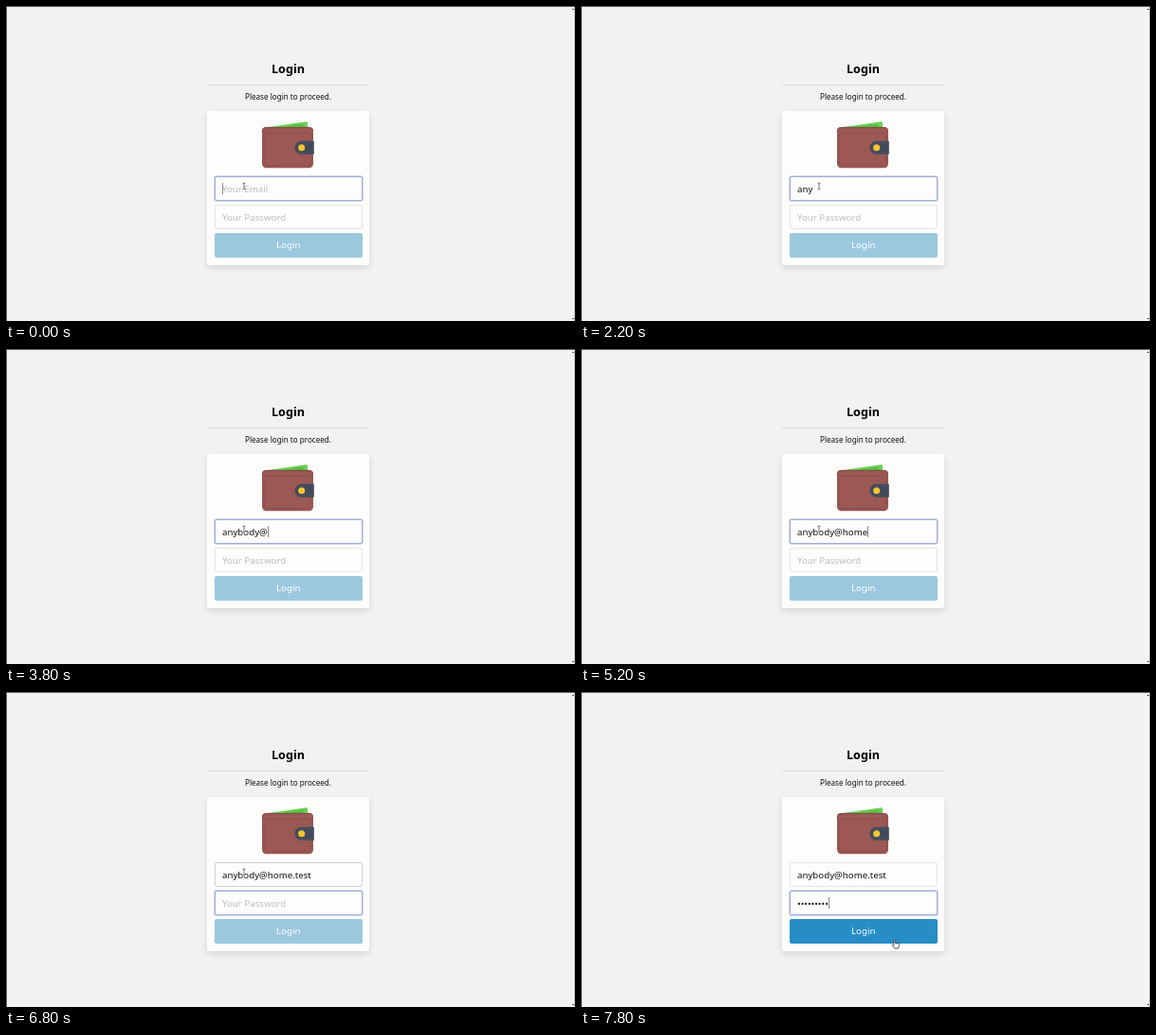
Recreate the animation shown at these times as an HTML page. Size 600 by 333 pixels, loop 8000 ms.

```html
<!DOCTYPE html>
<html lang="en">
<head>
<meta charset="utf-8">
<title>Login</title>
<style>
  html, body { margin: 0; width: 100%; height: 100%; overflow: hidden; }
  body {
    position: relative;
    background: #f3f2f0;
    color: #111;
    font: 9.7px "Noto Sans", "Open Sans", sans-serif;
  }
  body > *, .card > * { position: absolute; box-sizing: border-box; }
  .edge { inset: 0; border: solid #5c5c5c; border-width: 1px 0 0 1px; }
  .bar { right: 0; top: 1px; bottom: 0; width: 3px; background: #f8f8f7; border-right: 1px solid #bdbdbd; }
  .bar::before, .bar::after {
    content: ""; position: absolute; left: 0; width: 2px; height: 1px; background: #555;
  }
  .bar::before { top: 2px; }
  .bar::after { bottom: 2px; }
  h1, p { left: 212px; width: 171px; margin: 0; text-align: center; white-space: nowrap; }
  h1 { top: 56.5px; font-size: 12.6px; line-height: 20px; font-weight: 700; color: #000; }
  p { top: 86px; font-size: 8.1px; line-height: 20px; }
  hr { left: 212px; top: 83px; width: 171px; height: 1px; margin: 0; border: 0; background: #d9d9d8; }
  .card {
    left: 212px; top: 111px; width: 171px; height: 163px;
    background: #fdfdfc; border-radius: 2px;
    box-shadow: 0 3px 7px rgba(0, 0, 0, .12);
  }
  .field, .button { left: 8px; width: 155.5px; height: 26px; border-radius: 2px; }
  .field {
    display: flex; align-items: center; padding-left: 7px;
    border: 1px solid #e5e5e4; background: #fdfdfc; white-space: pre;
  }
  .field.fading { border-color: #cfcfd3; }
  .field.focus { border-color: #a3abd9; box-shadow: 0 0 0 .8px #c6cbe9; }
  .field.empty .text { color: #bdbdbd; }
  .caret { width: 1px; height: 12px; margin-right: -1px; background: #8a8a8a; visibility: hidden; }
  .empty .caret { order: -1; }
  .on .caret { visibility: visible; }
  #email { top: 69px; }
  #pass { top: 99px; }
  .button { top: 129px; height: 25.5px; line-height: 25px; text-align: center; color: #fff; background: #9cc8df; }
  .button.ready { background: #278dc5; }
  svg { left: 0; top: 0; width: 600px; height: 333px; }
</style>
</head>
<body>
<div class="edge"></div>
<div class="bar"></div>
<h1>Login</h1>
<hr>
<p>Please login to proceed.</p>
<div class="card">
  <div class="field" id="email"><span class="text"></span><i class="caret"></i></div>
  <div class="field" id="pass"><span class="text"></span><i class="caret"></i></div>
  <div class="button" id="login">Login</div>
</div>
<svg viewBox="0 0 600 333">
  <path d="M273 128.5 L316.5 122.2 Q318 122 318 123.5 V131 H273Z" fill="#6bd053"/>
  <path d="M283 129 L313 124.8 L315 129Z" fill="#57bd44"/>
  <rect x="270" y="128" width="54" height="43.3" rx="4.5" fill="#9b5854"/>
  <path d="M270.4 134 V131.5 Q270.4 128.4 274 128.4 H320 Q323.6 128.4 323.6 132" fill="none" stroke="#7d4543" stroke-width=".8"/>
  <rect x="272.2" y="134.5" width="49.6" height="34" rx="2.5" fill="none" stroke="#7b4441" stroke-width=".8" stroke-dasharray="2 1.5"/>
  <path d="M311.5 142.8 H324.8 V156.8 H311.5 A7 7 0 0 1 311.5 142.8Z" fill="#404a5b"/>
  <path d="M323 144.5 H312 A5.4 5.4 0 0 0 312 155.2 H323" fill="none" stroke="#5a6577" stroke-width=".6" stroke-dasharray="1.6 1.2"/>
  <circle cx="311.7" cy="149.8" r="3.5" fill="#f6c52f"/>
  <g id="beam" transform="translate(251 190.5)" fill="none">
    <path d="M-1.5 -3.5 Q0 -3.5 0 -2.5 Q0 -3.5 1.5 -3.5 M0 -2.5 V2.5 M-1.5 3.5 Q0 3.5 0 2.5 Q0 3.5 1.5 3.5" stroke="#fff" stroke-width="1.6"/>
    <path d="M-1.5 -3.5 Q0 -3.5 0 -2.5 Q0 -3.5 1.5 -3.5 M0 -2.5 V2.5 M-1.5 3.5 Q0 3.5 0 2.5 Q0 3.5 1.5 3.5" stroke="#444" stroke-width=".75"/>
  </g>
  <path id="hand" d="M-2 -4.3 Q-1 -5 -.5 -4 V-1.6 L2.7 -1 Q3.6 -.6 3.4 .7 L2.6 4 H-1.2 L-3.8 .7 Q-3.8 -.5 -2 .4Z" fill="#fff" stroke="#333" stroke-width=".8" stroke-linejoin="round"/>
</svg>
<script>
  const LOOP = 8000, STEP = 200;
  const $ = id => document.getElementById(id);
  const email = $("email"), pass = $("pass"), login = $("login");

  const address = "anybody@home.test";
  // [start, text]: a slip, its correction, then the rest
  const keys = [[0, ""], [800, "a"], [1000, "an"], [1200, "any"], [1400, "anyno"],
    [1600, "anynod"], [1800, "anyno"], [2000, "anyn"], [2200, "any"]];
  const resume = [2600, 2800, 3000, 3200, 3800, 4600, 4800, 5000, 5200, 5400, 5600, 5800, 6000, 6200];
  resume.forEach((at, i) => keys.push([at, address.slice(0, 4 + i)]));
  const dots = [[0, 0], [7000, 3], [7200, 6], [7400, 9]];
  const blinkOff = [[200, 800], [2200, 2600], [3400, 3800], [4200, 4600], [6800, 7000]];

  const at = (list, t) => list.filter(k => k[0] <= t).pop()[1];

  function fill(box, text, hint, focus, caret) {
    box.firstChild.textContent = text || hint;
    box.classList.toggle("empty", !text);
    box.classList.toggle("focus", focus);
    box.classList.toggle("on", focus && caret);
  }

  function draw(ms) {
    const t = Math.floor(ms % LOOP / STEP) * STEP;
    const caret = !blinkOff.some(([a, b]) => t >= a && t < b);
    const second = t >= 6800;
    fill(email, at(keys, t), "Your Email", !second, caret);
    fill(pass, "•".repeat(at(dots, t)), "Your Password", second, caret);
    email.classList.toggle("fading", t === 6800);
    login.classList.toggle("ready", t >= 7400);

    const move = Math.max(0, Math.min(1, (t - 7400) / 400));
    const x = 251 + 81 * move, y = 190.5 + 76.5 * move;
    const over = y > 240;
    $("beam").setAttribute("transform", `translate(${x} ${y})`);
    $("hand").setAttribute("transform", `translate(${x} ${y})`);
    $("beam").style.display = over ? "none" : "";
    $("hand").style.display = over ? "" : "none";
  }

  const start = performance.now();
  function tick() {
    draw(performance.now() - start);
    requestAnimationFrame(tick);
  }
  tick();
</script>
</body>
</html>
```
